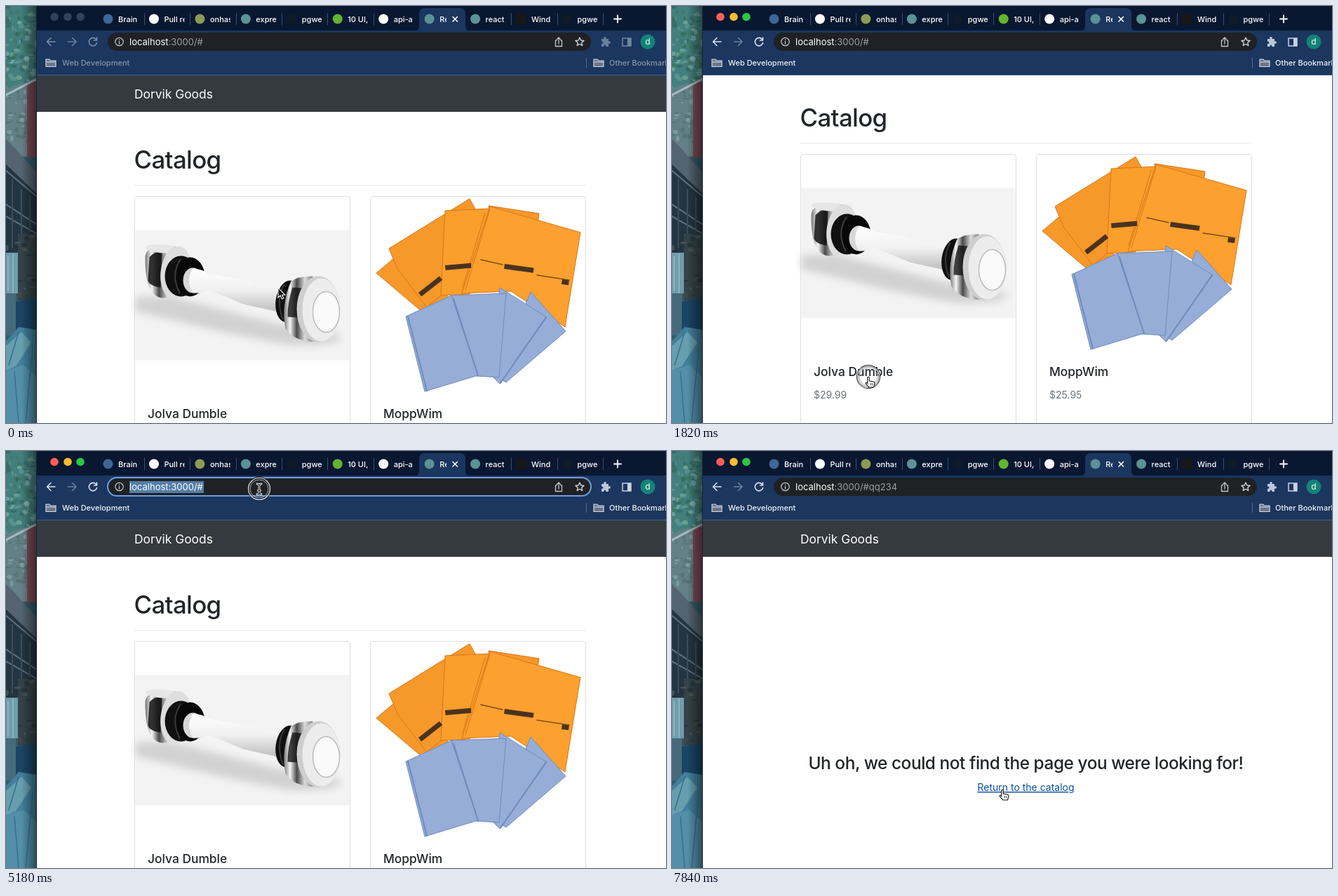
Recreate the animation shown at these times as an HTML page. Size 941 by 595 pixels, loop 8000 ms.

```html
<!DOCTYPE html>
<html lang="en">
<head>
<meta charset="utf-8">
<title>Shop walkthrough</title>
<style>
  html, body { margin: 0; width: 100%; height: 100%; overflow: hidden; background: #fff; }
  svg { display: block; width: 941px; height: 595px; }
  text { font-family: Inter, Roboto, sans-serif; white-space: pre; }
  .big { letter-spacing: -.018em; font-weight: 500; }
  .line { fill: none; stroke-linecap: round; stroke-linejoin: round; }
  .off { display: none; }
  .blurred .dims { opacity: .5; }
</style>
</head>
<body>
<svg id="stage" viewBox="0 0 941 595" xmlns="http://www.w3.org/2000/svg"></svg>
<script>
const LOOP = 8000, TICK = 70;
const SHOP = 'Dorvik Goods', WEIGHT = 'Jolva Dumble', CLOTH = 'MoppWim', ENGINE = 'Quavex';
const INK = '#212529', MUTED = '#6c757d', HOST = 'localhost';

// Step tables: [start, value]
const pages = [[0, 'catalog'], [2030, 'detail'], [3500, 'empty'], [3850, 'catalog'], [6650, 'lost']];
const bars = [[0, 'idle'], [4550, 'selected'], [5250, 'caret'], [5530, 'typing'], [6650, 'idle']];
const paths = [[0, '/#'], [2030, '/#products?productId=1'], [3500, '/#'], [6650, '/#qq234']];
const typed = [[0, ''], [5530, 'q'], [5600, 'qq'], [6090, 'qq23'], [6300, 'qq234']];
const pointers = [[0, 'arrow'], [1820, 'hand'], [2240, 'arrow'], [2940, 'hand'], [3500, 'ibeam'],
  [3990, 'arrow'], [4340, 'ibeam'], [5530, 'arrow'], [6650, 'ibeam'], [7140, 'arrow'], [7630, 'hand']];
const clicks = [[1820, 1890], [1960, 2030], [3430, 3570], [4550, 4690], [5180, 5320]];
// Eased tracks: [time, ...values]
const scrollTrack = [[280, 0], [700, 51], [1330, 60], [2029, 60], [2030, 0]];
const mouseTrack = [[0, 388, 402], [1400, 388, 401], [1820, 280, 529], [2170, 280, 529], [2450, 376, 153],
  [2590, 376, 153], [3010, 309, 234], [3780, 309, 236], [3920, 309, 236], [4480, 361, 54],
  [7070, 361, 54], [7280, 404, 438], [7420, 404, 438], [7840, 471, 483]];

const stepAt = (table, t) => table.filter(row => row[0] <= t).pop()[1];
function trackAt(track, t) {
  const next = track.findIndex(row => row[0] > t);
  if (next < 0) return track[track.length - 1].slice(1);
  if (next === 0) return track[0].slice(1);
  const a = track[next - 1], b = track[next];
  const u = (t - a[0]) / (b[0] - a[0]), k = u * u * (3 - 2 * u);
  return a.slice(1).map((v, i) => v + (b[i + 1] - v) * k);
}

// Markup helpers
const text = (x, y, s, size, fill, more = '') => `<text x="${x}" y="${y}" font-size="${size}" fill="${fill}" ${more}>${s}</text>`;
const rect = (x, y, w, h, fill, more = '') => `<rect x="${x}" y="${y}" width="${w}" height="${h}" fill="${fill}" ${more}/>`;
const disc = (x, y, r, fill, more = '') => `<circle cx="${x}" cy="${y}" r="${r}" fill="${fill}" ${more}/>`;
const oval = (x, y, rx, ry, fill, more = '') => `<ellipse cx="${x}" cy="${y}" rx="${rx}" ry="${ry}" fill="${fill}" ${more}/>`;
const shape = (d, fill, more = '') => `<path d="${d}" fill="${fill}" ${more}/>`;
const line = (d, color, w = 1.6) => `<path class="line" d="${d}" stroke="${color}" stroke-width="${w}"/>`;
const poly = (points, fill, edge) => `<polygon points="${points}" fill="${fill}" stroke="${edge}" stroke-width="1"/>`;
const frame = (x, y, w, h) => rect(x, y, w, h, '#fff', 'rx="3.5" stroke="#dedede"');
const gradient = (id, stops, vertical) => `<linearGradient id="${id}" x2="${vertical ? 0 : 1}" y2="${vertical ? 1 : 0}">` +
  stops.map(([at, c]) => `<stop offset="${at}" stop-color="${c}"/>`).join('') + '</linearGradient>';

function wallpaper() {
  let seed = 7;
  const rnd = () => (seed = seed * 16807 % 2147483647) / 2147483647;
  const blobs = (n, y, h, colors) => Array.from({ length: n }, () =>
    oval(rnd() * 44, y + rnd() * h, 1 + rnd() * 4, 1 + rnd() * 3, colors[Math.floor(rnd() * colors.length)], 'opacity=".6"')).join('');
  return rect(0, 0, 44, 595, '#315b6a') +
    rect(0, 0, 44, 118, '#437f7d') + blobs(130, 0, 118, ['#2e625d', '#659f99', '#3d765f', '#87b5ad']) +
    shape('M0 118L30 108V215H0Z', '#638087') + blobs(50, 122, 80, ['#47736e', '#8aabb0', '#4f6b6d']) +
    rect(30, 108, 14, 108, '#794852') + line('M0 127L44 104', '#a5bbc2', 3) +
    shape('M0 190L12 202 44 238V280L0 235Z', '#53636f') +
    shape('M0 226L44 268V352H0Z', '#243541') +
    line('M0 235L44 272M0 283L44 312M0 300L44 325', '#5d7380', 2) +
    line('M9 248V345M22 262V345M34 272V345', '#394e59', 2) +
    rect(17, 325, 27, 95, '#354349') + blobs(25, 325, 90, ['#202e37', '#52646a', '#445047']) +
    rect(0, 352, 17, 58, '#709cab') + line('M3 358V406M10 354V409', '#8db4bd', 2) +
    shape('M0 410H14V470H0Z', '#466a79') + shape('M14 422L44 416V468L14 470Z', '#1a4565') +
    shape('M0 478L18 458 44 462V595H0Z', '#427f9c') +
    shape('M0 485L22 465 36 480 14 514 0 520Z', '#679eae') + shape('M0 520L25 512 44 530V595H0Z', '#548fa9') +
    line('M18 465L4 512M38 486L28 595M12 522L18 595', '#34718e', 1.5) +
    rect(22, 0, 22, 595, 'url(#edge)');
}

function dumbbell() {
  return `<g>${rect(0, 0, 305, 186, '#f3f3f3')}
    ${shape('M0 96L50 95 195 132 292 150Q300 166 218 164L130 147 0 116Z', '#c9c9c9', 'filter="url(#soft)" opacity=".8"')}
    ${shape('M14 38Q15 26 34 22L62 24 66 96 38 97Q13 94 14 38Z', 'url(#chrome)')}
    ${shape('M20 39Q26 31 38 31L36 82Q20 80 18 72Z', '#111', 'opacity=".85"')}
    ${oval(39, 27, 25, 6, '#e6e6e6', 'transform="rotate(5 39 27)"')}
    ${oval(58, 61, 22, 38, '#dedede', 'transform="rotate(7 58 61)"')}
    ${oval(65, 66, 23, 29, '#111')}${oval(78, 67, 21, 28, '#080808')}
    ${line('M64 42Q50 64 63 90', '#3b3b3b', 2)}
    ${oval(82, 72, 14, 18, '#d7d7d7')}
    ${shape('M82 55Q97 56 104 63 146 68 176 77L207 88Q213 102 204 117 181 112 154 106L104 85Q94 91 82 90 71 72 82 55Z', 'url(#handle)')}
    ${oval(218, 102, 18, 30, '#101010', 'transform="rotate(8 218 102)"')}
    ${line('M212 78Q200 99 210 127', '#383838', 2)}
    ${shape('M222 73Q232 66 253 66L260 159Q228 161 214 141 207 108 222 73Z', 'url(#chrome)')}
    ${shape('M224 82L247 84 245 126 217 124Q217 102 224 82Z', '#151515', 'opacity=".8"')}
    ${oval(261, 113, 31, 47, '#cecece')}${oval(265, 114, 27, 45, '#ececec')}
    ${oval(272, 117, 19, 29, '#fafafa', 'stroke="#bcbcbc" stroke-width="1.5"')}</g>`;
}

function cloths() {
  const orange = '#f7982b', fold = '#d87716', blue = '#95add7', crease = '#6f8cbd';
  const label = (x, y, w, angle) => rect(x, y, w, 7, '#49331f', `transform="rotate(${angle} ${x} ${y})"`);
  return poly('528,381 560,354 632,416 594,437', orange, fold) +
    poly('546,346 661,275 671,293 632,403 600,430 558,375', orange, fold) +
    poly('626,292 692,289 661,411 620,413', '#fa9e2c', fold) +
    poly('688,285 760,296 758,310 690,302', orange, fold) +
    poly('690,286 819,323 797,458 720,407 650,410', '#fca02f', fold) +
    line('M690 290L655 405M683 295L651 402', fold, 1) +
    line('M677 362L708 369M757 384L803 391', '#7c4c1d', 1.5) +
    label(588, 409, 38, -38) + label(626, 370, 37, -5) + label(711, 368, 42, 8) + label(793, 390, 10, 8) +
    poly('748,408 798,464 713,537 698,528', blue, crease) +
    poly('704,402 771,444 704,539 690,525', blue, crease) +
    poly('634,413 713,410 703,530 670,528', blue, crease) +
    poly('570,443 635,413 673,527 597,550', blue, crease) +
    line('M573 443L600 549M638 418L673 527M770 444L705 538', crease, 2);
}

function catalog() {
  const card = (x, name, price) => frame(x + .5, 271.5, 307, 420) + `%` +
    text(x + 19, 588, name, 17.4, INK, 'font-weight="500"') + text(x + 19, 620, price, 14, MUTED);
  return card(183, WEIGHT, '$29.99').replace('%', `<g transform="translate(184.5 319.5)">${dumbbell()}</g>`) +
    card(519, CLOTH, '$25.95').replace('%', cloths());
}

const detail = () => frame(183.5, 196.5, 643, 520) +
  text(214, 239, '&lt; Back to catalog', 14, MUTED) +
  `<g transform="translate(203 343) scale(.7705)">${dumbbell()}</g>` +
  text(466, 280, WEIGHT, 27.8, INK, 'class="big"') +
  text(466, 312, '$29.99', 17.4, MUTED, 'font-weight="500"') +
  text(466, 341, 'Dynamic Inertia technology ignites muscles in', 14, INK) +
  text(466, 363, 'arms, shoulders, and chest.', 14, INK);

const lost = () => text(504.5, 454, 'Uh oh, we could not find the page you were looking for!', 24.4, INK, 'class="big" text-anchor="middle"') +
  text(504.5, 485, 'Return to the catalog', 14, '#007bff', 'id="link" text-anchor="middle"');

function tabs() {
  const list = [['Brain', '#3d6796'], ['Pull re', '#fff'], ['onhas', '#8b9c55'], ['expre', '#5a9296'], ['pgwe', '#101b29'],
    ['10 UI,', '#65b32e'], ['api-a', '#fff'], ['Re', '#5a9296'], ['react', '#5a9296'], ['Wind', '#191716'], ['pgwe', '#101b29']];
  return rect(44, 0, 897, 36, '#091731') +
    shape('M581 36Q589 36 589 28V11Q589 3 597 3H647Q655 3 655 11V28Q655 36 663 36Z', '#1b365f') +
    list.map(([name, color], i) => {
      const x = 160 + i * 65.45, w = i === 7 ? 10 : 29;
      const icon = name === 'Wind' ? rect(x - 22, 11.5, 14, 14, color) : disc(x - 14.5, 18.5, 7, color);
      const bar = i === 6 || i === 7 ? '' : rect(Math.round(x + 36.6), 10, 1, 17, '#3c4d6b');
      return icon + `<svg x="${x}" y="8" width="${w}" height="22">${text(0, 14.5, name, 11, '#fff', 'font-weight="500"')}</svg>` + bar;
    }).join('') +
    line('M637 15.5l6.5 6.5m0-6.5l-6.5 6.5', '#fff') + line('M867 18.5h10m-5-5v10', '#fff', 2);
}

const folder = x => shape(`M${x} 76h5l1.5 2H${x + 14}V86.500H${x}Z`, '#68758b', 'stroke="#d7dce5" stroke-width="1.2"') + line(`M${x + 1} 80H${x + 13}`, '#d7dce5', 1);
const globe = y => disc(161, y, 5.8, '#c3c7cc') + shape(`M156 ${y - 1}l3 1 2 3-1 2q-4-1-4-6M162 ${y - 5}l-1 3 3 1 1 3 1.500-2q0-4-4.500-5`, '#3a3d40');
const caretless = (id, x, y, color, more = '') => text(x, y, '', 13, color, `id="${id}" ${more}`);

function toolbar() {
  return rect(44, 35, 897, 64, '#1b365f') + rect(44, 98, 897, 1, '#3f618d') +
    `<g class="dims">${line('M70 51H58.500M64 45.500L58.500 51 64 56.500', '#dce3ee')}
    ${line('M128.500 47.500A5.700 5.700 0 1 0 129.600 52.500M129.500 45V49H125.500', '#dce3ee')}
    ${shape('M849 47h3.500q-1-3 1.500-3t1.500 3H859v3.500q3-1 3 1.500t-3 1.500V58H855.500q0-2.500-1.600-2.500T852.300 58H849V54q2.500 0 2.500-1.800T849 50.500Z', '#bac8da')}
    ${rect(879, 46, 12, 11, 'none', 'stroke="#c9d3e2" stroke-width="1.5"')}${rect(886, 46, 5, 11, '#c9d3e2')}
    ${text(80, 85, 'Web Development', 11, '#f0f3f7', 'font-weight="500"')}
    ${text(860, 85, 'Other Bookmarks', 11, '#f0f3f7', 'font-weight="500"')}</g>` +
    line('M88.500 51H100M94.500 45.500L100 51 94.500 56.500', '#6c80a0') +
    folder(57) + folder(838) + rect(827, 74, 1, 14, '#536b8d') +
    disc(915, 51, 10.5, '#128477') + text(915, 55, 'd', 12, '#fff', 'text-anchor="middle"') +
    rect(145, 38, 689, 26, '#202124', 'id="pill" rx="13"') +
    disc(161.500, 51, 5.7, 'none', 'stroke="#c3c7cc" stroke-width="1.2"') + line('M161.500 50.500V54M161.500 48V48.200', '#c3c7cc', 1.3) +
    line('M785 49H783.500V57.500H792.500V49H791M788 54V45.500M785.500 47.500L788 45 790.500 47.500', '#c3c7cc', 1.3) +
    line('M818 45l1.800 4 4.300.4-3.300 2.900 1 4.200-3.800-2.200-3.800 2.200 1-4.200-3.300-2.900 4.300-.4Z', '#d8dbdf', 1.3) +
    rect(176, 43, 106, 17, '#547ea7', 'id="selection"') + caretless('url', 176, 55.7, '#9aa0a6') +
    rect(283, 44, 1, 15, '#fff', 'id="caret"');
}

const dropdown = () => shape('M139 43Q139 35 147 35H832Q840 35 840 43V135Q840 143 832 143H147Q139 143 139 135Z', '#202124', 'filter="url(#drop)"') +
  rect(139, 68, 701, 34, '#353a40') + rect(139, 68, 3, 34, '#6ba0f5') + globe(51) + globe(85) +
  disc(160, 117, 3.700, 'none', 'stroke="#c3c7cc" stroke-width="1.4"') + line('M163 120l4 4', '#c3c7cc', 1.4) +
  caretless('entry', 186.5, 55.7, '#9aa0a6') + caretless('match', 186.5, 89.5, '#649bea', 'font-weight="600"') +
  caretless('search', 186.5, 123, '#fff');

const pointerArt = {
  arrow: shape('M0 0V14L3.200 11 5.500 16 7.800 15 5.600 10.200H9.800Z', '#000', 'stroke="#fff" stroke-width="1.1"'),
  ibeam: ['#fff', '#111'].map((c, i) => line('M-3-7Q0-7 0-5 0-7 3-7M0-5V6M-3 7.500Q0 7.500 0 5.500 0 7.500 3 7.500M-1.500 2.500H1.500', c, i ? 1.1 : 2.8)).join(''),
  hand: shape('M-1.300 1Q0-.6 1.300 1V6L7.500 7.200Q9.300 7.700 9 9.700L7.500 15H1L-4 9.500Q-4 7.900-2.400 8.300L-1.300 9.500Z', '#fff', 'stroke="#111" stroke-width="1.1"') + line('M3.500 9v3M5.800 9.500V12', '#111', .8)
};
const group = (id, body) => `<g id="${id}">${body}</g>`;

const stage = document.getElementById('stage');
stage.innerHTML = `<defs>
  ${gradient('chrome', [[0, '#777'], [.18, '#f6f6f6'], [.38, '#4a4a4a'], [.62, '#ddd'], [.82, '#8a8a8a'], [1, '#eee']])}
  ${gradient('handle', [[0, '#fff'], [.5, '#f0f0f0'], [1, '#bdbdbd']], true)}
  ${gradient('edge', [[0, '#0000'], [1, '#0007']])}
  <filter id="soft" x="-.2" y="-.3" width="1.4" height="1.6"><feGaussianBlur stdDeviation="6"/></filter>
  <filter id="drop" x="-.1" y="-.1" width="1.2" height="1.4"><feDropShadow dx="0" dy="3" stdDeviation="4" flood-opacity=".4"/></filter>
  <clipPath id="view">${rect(44, 99, 897, 496, '#fff')}</clipPath></defs>` +
  wallpaper() + rect(44, 99, 897, 496, '#fff') +
  `<g clip-path="url(#view)">${group('page',
    rect(44, 99, 897, 52, '#343a40') + text(183, 132, SHOP, 17.4, '#fff') +
    group('heading', text(182.5, 232, 'Catalog', 34.8, INK, 'class="big"') + rect(183, 255.5, 643.5, 1, '#e3e3e3')) +
    group('catalog', catalog()) + group('detail', detail()) + group('lost', lost()))}</g>` +
  group('chromebar', tabs() + group('lights', [69, 88, 106].map(x => disc(x, 15.5, 5.8, '')).join('')) + toolbar()) +
  group('dropdown', dropdown()) + rect(43, 0, 1, 595, '#172638') +
  group('pointer', group('ring', disc(0, 0, 15.8, 'none', 'stroke="#222" stroke-width="2.5"') +
    disc(0, 0, 15.5, 'none', 'stroke="#e3e3e3" stroke-width="1.2"') + disc(0, 0, 13, 'none', 'stroke="#aaa" stroke-width="1"')) +
    Object.keys(pointerArt).map(k => group(k, pointerArt[k])).join(''));

const el = id => document.getElementById(id);
const show = (id, on) => el(id).classList.toggle('off', !on);
const urlSpans = (path, rest = '#9aa0a6') => `<tspan fill="#fff">${HOST}</tspan><tspan fill="${rest}">:3000${path}</tspan>`;
const lightColors = ['#ff5f57', '#febc2e', '#28c840'];

function render(ms) {
  const t = Math.floor(ms / TICK) * TICK;
  const page = stepAt(pages, t), bar = stepAt(bars, t), query = stepAt(typed, t), kind = stepAt(pointers, t);
  const active = t >= 1820, focused = bar === 'selected' || bar === 'caret';
  const [x, y] = trackAt(mouseTrack, t);

  for (const id of ['catalog', 'detail', 'lost']) show(id, page === id);
  show('heading', page === 'catalog' || page === 'empty');
  el('page').setAttribute('transform', `translate(0 ${-Math.round(trackAt(scrollTrack, t)[0])})`);
  el('link').setAttribute('fill', t >= 7630 ? '#0b4f9c' : '#007bff');
  el('link').setAttribute('text-decoration', t >= 7630 ? 'underline' : 'none');

  el('chromebar').classList.toggle('blurred', !active);
  [...el('lights').children].forEach((dot, i) => dot.setAttribute('fill', active ? lightColors[i] : '#344259'));
  el('pill').setAttribute('stroke', focused ? '#6d9fe3' : 'none');
  el('pill').setAttribute('stroke-width', 2);
  el('url').innerHTML = urlSpans(stepAt(paths, t), bar === 'selected' ? '#fff' : undefined);
  show('selection', bar === 'selected');
  show('caret', bar === 'caret');

  show('dropdown', bar === 'typing');
  el('entry').innerHTML = urlSpans('/#' + query) + '<tspan fill="#fff" font-weight="200">|</tspan>';
  el('match').textContent = `${HOST}:3000/#${query}`;
  el('search').innerHTML = `${HOST}:3000/#${query}<tspan fill="#9aa0a6"> – ${ENGINE} Search</tspan>`;

  el('pointer').setAttribute('transform', `translate(${x} ${y})`);
  for (const id in pointerArt) show(id, id === kind);
  show('ring', clicks.some(([from, to]) => t >= from && t < to));
}

const start = performance.now();
function play() {
  render((performance.now() - start) % LOOP);
  requestAnimationFrame(play);
}
play();
</script>
</body>
</html>
```
